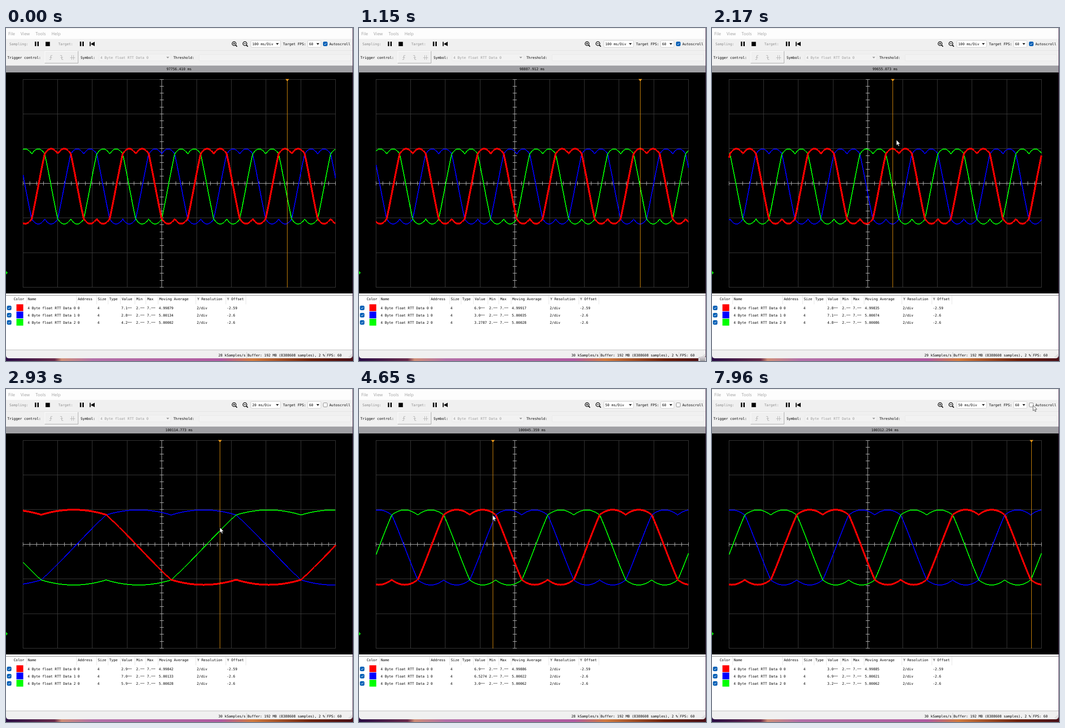
An HTML page with a canvas for the animation above (8 s loop, 763 by 734 pixels).

```html
<!DOCTYPE html>
<html lang="en">
<head>
<meta charset="utf-8">
<title>Scope</title>
<style>
html, body { margin: 0; width: 100%; height: 100%; overflow: hidden; background: #f0f0f0; }
canvas { display: block; }
</style>
</head>
<body>
<canvas id="stage" width="763" height="734"></canvas>
<script>
const c = document.getElementById('stage').getContext('2d');
const MONO = '7.65px "DejaVu Sans Mono", monospace';
const MENU = '9.3px "Open Sans", sans-serif';
const LOOP = 8000, STEP = 68;
const DIV = 76.4, LEFT = 37, RIGHT = 724, TOP = 113;

// Signal: period in ms and a moment where channel 0 falls through its centre
const PERIOD = 224.418744, FALL = 100067.778922;
// Point of the frozen view that zooming keeps in place
const ANCHOR_X = 353.08, ANCHOR_T = 100084.151;
const FREEZE = 2650, REST_X = 618;

// Pointer stops: time, x, y
const STOPS = [
  [1200, 770, 745], [1564, 310, 258], [1700, 378, 222], [2924, 470.2, 305], [4624, 293.7, 278],
  [5400, 151, 272], [6188, 311.7, 270], [7400, 697, 200], [7956, 706, 36]
];

const CHANNELS = [
  { color: '#ff0000', width: 4, zero: 539.8, offset: '-2.59', mean: 4.9987 },
  { color: '#0000ff', width: 2, zero: 540.3, offset: '-2.6', mean: 5.0008 },
  { color: '#00ff00', width: 2, zero: 540.3, offset: '-2.6', mean: 5.0004 }
];

const ease = u => u * u * u * (u * (6 * u - 15) + 10);
const noise = n => Math.abs(Math.sin(n * 12.9898 + 1.5) * 43758.5453) % 1;

function pointerAt(t) {
  let i = 0;
  while (i < STOPS.length - 2 && t >= STOPS[i + 1][0]) i++;
  const [t0, x0, y0] = STOPS[i], [t1, x1, y1] = STOPS[i + 1];
  const u = ease(Math.min(1, Math.max(0, (t - t0) / (t1 - t0))));
  return [x0 + (x1 - x0) * u, y0 + (y1 - y0) * u];
}

// The cursor line trails the pointer by one refresh and stays where it left the plot
function cursorAt(t) {
  for (let s = t - STEP; s > 0; s -= STEP) {
    const [x, y] = pointerAt(s);
    if (x > LEFT && x < RIGHT && y > 98 && y < 585) return x;
  }
  return REST_X;
}

function viewAt(t, x) {
  if (t < FREEZE) return {
    ms: 100,
    time: 97756.41 + t * (.94881589 + 2.59447e-5 * t) + (x - REST_X) * 100 / DIV,
    edge: 156.5 - t * (.7466 - 7.56e-6 * t)
  };
  const ms = t > 2790 && t < 3690 ? 20 : 50;
  return {
    ms,
    time: ANCHOR_T + (x - ANCHOR_X) * ms / DIV,
    edge: ANCHOR_X + 1.1 + (FALL - ANCHOR_T) * DIV / ms
  };
}

// Three-phase wave with min/max injection; phase in periods after the fall
function signal(phase, ch) {
  const s = [0, 1, 2].map(k => -Math.sin((phase - k / 3) * 2 * Math.PI));
  return 5 + 2.5 * (s[ch] - (Math.max(...s) + Math.min(...s)) / 2);
}

function rect(x, y, w, h, color) {
  c.fillStyle = color;
  c.fillRect(x, y, w, h);
}

function frame(x, y, w, h, fill, stroke, r = 0) {
  c.beginPath();
  c.roundRect(x + .5, y + .5, w - 1, h - 1, r);
  c.fillStyle = fill;
  c.fill();
  c.strokeStyle = stroke;
  c.lineWidth = 1;
  c.stroke();
}

function path(points, color, width = 1) {
  c.beginPath();
  points.forEach(([x, y]) => c.lineTo(x, y));
  c.strokeStyle = color;
  c.lineWidth = width;
  c.stroke();
}

function shape(points, color) {
  c.beginPath();
  points.forEach(([x, y]) => c.lineTo(x, y));
  c.closePath();
  c.fillStyle = color;
  c.fill();
}

function text(s, x, y, color = '#000', font = MONO, align = 'left') {
  c.font = font;
  c.textAlign = align;
  c.fillStyle = color;
  c.fillText(s, x, y + 2.8);
}

function shortText(s, max, keep, x, y) {
  if (s.length <= max) return text(s, x, y);
  text(s.slice(0, keep), x, y);
  for (let i = 0; i < 3; i++) rect(x + keep * 4.6 + 1 + i * 3, y - 1, 1.4, 1.4, '#000');
}

function checkbox(x, y, on) {
  if (!on) return frame(x, y, 10, 10, '#f6f6f6', '#858585', 2);
  frame(x, y, 10, 10, '#0560b6', '#0560b6', 2);
  path([[x + 2.5, y + 5], [x + 4.3, y + 6.9], [x + 7.6, y + 3.2]], '#fff');
}

function arrow(x, y, color) {
  shape([[x - 3.2, y - 1.6], [x + 3.2, y - 1.6], [x, y + 2]], color);
}

function combo(x, w, label, color = '#000', fill = '#fff', y = 35) {
  frame(x, y - 8, w, 16, fill, color === '#000' ? '#d0d0d0' : '#e9e9e9', 2);
  text(label, x + 3.5, y, color);
  arrow(x + w - 7.3, y, color);
}

function pause(x) {
  rect(x, 30, 3, 10, '#000');
  rect(x + 5.5, 30, 3, 10, '#000');
}

function magnifier(x, plus) {
  c.beginPath();
  c.arc(x, 34.5, 4.3, 0, 7);
  c.strokeStyle = '#111';
  c.lineWidth = 1.5;
  c.stroke();
  path([[x + 3, 37.5], [x + 6.5, 41]], '#111', 2);
  path([[x - 2.3, 34.5], [x + 2.3, 34.5]], '#111', 1.2);
  if (plus) path([[x, 32.2], [x, 36.8]], '#111', 1.2);
}

// Trigger edge symbol; dir 1 rises, -1 falls
function edgeIcon(x, dir) {
  const color = '#b4b4b4', y = 65;
  path([[x - 3.5, y + 4.5 * dir], [x, y + 4.5 * dir], [x, y - 4.5 * dir], [x + 3.5, y - 4.5 * dir]], color);
  path([[x - 2.5, y + dir], [x, y - 2 * dir], [x + 2.5, y + dir]], color);
}

function toolbar(ms, auto) {
  rect(0, 0, 762, 24, '#fdfdfd');
  rect(0, 24, 762, 59, '#f0f0f0');
  for (const y of [0, 49, 82]) rect(0, y, 762, 1, '#e2e2e2');
  [['File', 5], ['View', 32], ['Tools', 65], ['Help', 100]]
    .forEach(([s, x]) => text(s, x, 13.5, '#a0a0a0', MENU));

  text('Sampling:', 7.5, 35, '#8c8c8c');
  pause(63.5);
  rect(87, 30.5, 9.5, 9.5, '#000');
  text('Target:', 115, 35, '#8c8c8c');
  pause(162.5);
  rect(184, 30.5, 2, 9.5, '#000');
  shape([[186, 35.2], [195, 30.3], [195, 40.1]], '#000');

  magnifier(501.5, true);
  magnifier(525.3, false);
  combo(538, 66, ms + ' ms/Div');
  text('Target FPS:', 609, 35);
  combo(663, 30, '60');
  checkbox(697, 30, auto);
  text('Autoscroll', 711, 35);

  text('Trigger control:', 3, 65);
  path([[85.5, 78], [85.5, 51.5], [159, 51.5]], '#fbfbfb');
  path([[85, 77.5], [158.5, 77.5], [158.5, 51]], '#a6a6a6');
  edgeIcon(98.5, 1);
  edgeIcon(122.5, -1);
  for (const x of [144.5, 148.5]) path([[x, 60], [x, 70]], '#b4b4b4');
  path([[141, 65.5], [152, 65.5]], '#b4b4b4');
  text('Symbol:', 164, 65);
  combo(204, 159, '4 Byte float RTT Data 0', '#9a9a9a', '#f2f2f2', 65);
  text('Threshold:', 368, 65);
  frame(424, 58, 335, 15, '#f2f2f2', '#e8e8e8', 2);
}

function grid() {
  const line = '#3c3c3c', axis = '#bdbdbd', tick = DIV / 5;
  rect(0, 98, 762, 487, '#000');
  for (let i = 0; i < 10; i++) rect(Math.floor(LEFT + DIV * i), TOP, 1, 459, line);
  for (let i = 0; i < 7; i++) rect(LEFT, Math.floor(TOP + DIV * i), 688, 1, line);
  rect(LEFT, 342, 688, 1, axis);
  rect(342, TOP, 1, 459, axis);
  for (let i = 0; i <= 45; i++) rect(Math.floor(LEFT + tick * i), 338, 1, 9, axis);
  for (let i = 0; i <= 30; i++) rect(338, Math.floor(TOP + tick * i), 9, 1, axis);
  shape([[0, 535.5], [4, 539.5], [0, 543.5]], '#00e000');
}

// Crisp trace: columns where it is flat, rows where it is steep
function trace(f, w, color) {
  c.fillStyle = color;
  for (let x = LEFT; x < RIGHT; x++) {
    const y = f(x + .5), dy = f(x + 1.5) - y, n = Math.ceil(Math.abs(dy));
    if (n <= 1) c.fillRect(x, Math.round(y - w / 2), 1, w);
    else for (let i = 0; i < n; i++)
      c.fillRect(Math.round(x + .5 + i / n - w / 2), Math.floor(y + dy * i / n), w, 1);
  }
}

function waves(edge, ms) {
  const period = PERIOD * DIV / ms;
  for (const ch of [1, 2, 0]) {
    const { color, width, zero } = CHANNELS[ch];
    trace(x => zero - DIV / 2 * signal((x - edge) / period, ch), width, color);
  }
}

function cursorLine(x) {
  const px = Math.round(x);
  rect(px, TOP, 1, 459, '#e8960c');
  shape([[px - 3.5, 112.5], [px + 4.5, 112.5], [px + .5, 117.5]], '#ffa51e');
}

function table(t, time) {
  rect(0, 585, 762, 4, '#f0f0f0');
  rect(0, 589, 762, 120, '#fff');
  rect(0, 589, 762, 1, '#8a8a8a');
  rect(527, 590, 1, 19, '#e3e3e3');
  text('Color', 17, 597.5);
  [['Name', 48], ['Address', 158], ['Size', 202], ['Type', 227], ['Value', 254.5], ['Min', 286.5],
   ['Max', 310.5], ['Moving Average', 337], ['Y Resolution', 420.5], ['Y Offset', 486]]
    .forEach(([s, x]) => {
      rect(Math.floor(x - 3), 590, 1, 19, '#e3e3e3');
      text(s, x, 597.5);
    });
  CHANNELS.forEach(({ color, offset, mean }, i) => {
    const y = 617 + 16 * i;
    const average = mean + .0005 * Math.sin(t / 520 + 2 * i) + .0002 * (noise(t + i) - .5);
    checkbox(2, y - 5, true);
    rect(23, y - 8, 15, 15, color);
    text('4 Byte float RTT Data ' + i, 47.5, y);
    text('0', 157.5, y);
    text('4', 201, y);
    shortText(String(+signal((time - FALL) / PERIOD, i).toFixed(5)), 6, 3, 253.5, y);
    shortText('2.83481', 4, 2, 286, y);
    shortText('7.16519', 4, 2, 310, y);
    text(String(+average.toFixed(5)), 336, y);
    text('2/div', 419.5, y);
    text(offset, 485.5, y);
  });
}

function statusBar(t) {
  const sky = c.createLinearGradient(0, 0, 763, 0);
  [[0, '#2a0d45'], [.14, '#6a2a4c'], [.16, '#cf8f78'], [.25, '#b470a8'],
   [.62, '#b05aa0'], [.71, '#d07a40'], [.88, '#6e200c'], [1, '#4a1018']]
    .forEach(([p, color]) => sky.addColorStop(p, color));
  rect(0, 700, 763, 34, sky);
  rect(762, 0, 1, 728, '#4a2a4e');
  c.beginPath();
  c.roundRect(0, 700, 762, 28, [0, 0, 6, 6]);
  c.fillStyle = '#f0f0f0';
  c.fill();
  rect(0, 709, 762, 1, '#b8b8b8');
  text(30 - Math.floor(3 * noise(t / STEP)) + ' kSamples/s', 467, 721);
  rect(529, 714, 1, 13, '#c8c8c8');
  text('Buffer: 192 MB (8388608 samples), 2 % FPS: 60', 531, 721);
  rect(703, 714, 1, 13, '#d4d4d4');
  for (let i = 0; i < 3; i++)
    for (let j = 0; j <= i; j++) rect(759 - 2.6 * j, 719 + 2.6 * i, 1.3, 1.3, '#b0b0b0');
}

function trayHint() {
  frame(746, 725, 19, 14, '#d8d4d8', '#b8b0b8', 3);
  for (let i = 0; i < 4; i++) rect(750 + 3 * i, 729, 2, 1, '#555');
  rect(750, 732, 11, 1, '#555');
}

function pointer(x, y) {
  const p = [[0, 0], [0, 12], [2.7, 9.5], [4.6, 13.8], [6.5, 13], [4.7, 8.9], [8.4, 8.7]]
    .map(([dx, dy]) => [x + dx, y + dy]);
  shape(p, '#fff');
  path([...p, p[0]], '#222', .8);
}

function draw(now) {
  const t = STEP * Math.floor((now % LOOP + 15) / STEP);
  const x = cursorAt(t);
  const { ms, time, edge } = viewAt(t, x);
  toolbar(ms, t < FREEZE);
  rect(0, 83, 762, 15, '#a0a0a4');
  text(time.toFixed(3) + ' ms', 380.5, 90.5, '#000', MONO, 'center');
  grid();
  waves(edge, ms);
  cursorLine(x);
  statusBar(t);
  table(t, time);
  if (t > 1070 && t < 1250) trayHint();
  pointer(...pointerAt(t));
}

const start = performance.now();
function tick() {
  draw(performance.now() - start);
  requestAnimationFrame(tick);
}
tick();
</script>
</body>
</html>
```
